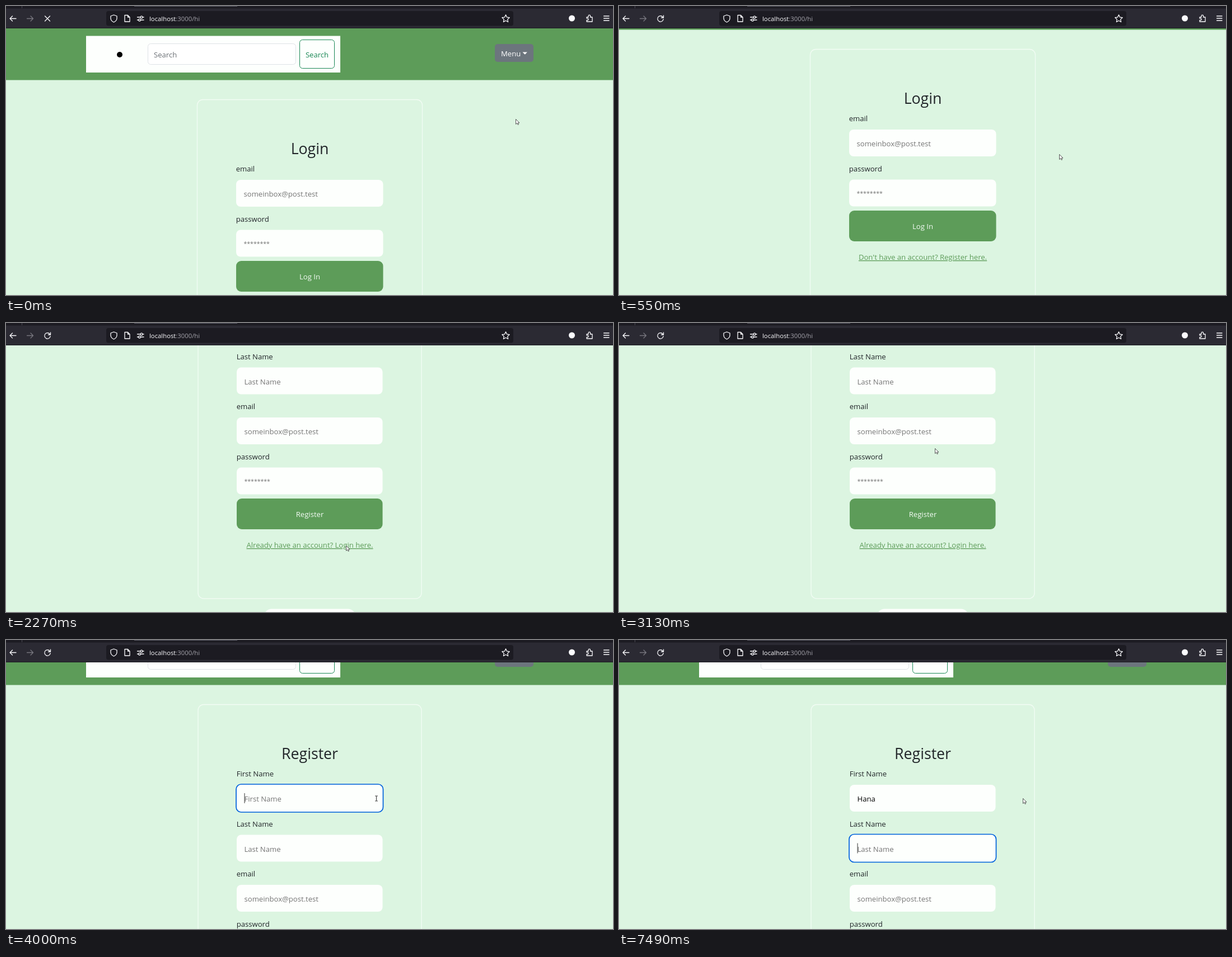
An HTML page for the animation above (8000 ms loop, 1084 by 517 pixels).

```html
<!DOCTYPE html>
<html lang="en">
<head>
<meta charset="utf-8">
<title>Login and register</title>
<style>
  html, body { margin: 0; width: 100%; height: 100%; overflow: hidden; background: #dcf5e1; }
  svg { display: block; font: 13.1px "Open Sans", "Noto Sans", sans-serif; }
  text { white-space: pre; }
  .mid { text-anchor: middle; }
  .title { font-size: 26.7px; }
  .hint { fill: #757575; }
  .stars { font-size: 10.5px; }
  .link { fill: #5d9c59; text-decoration: underline; text-decoration-thickness: 1px; }
  .line { fill: none; stroke: #fbfbfe; stroke-width: 1.3; stroke-linecap: round; stroke-linejoin: round; }
</style>
</head>
<body>
<svg width="1084" height="517" viewBox="0 0 1084 517">
  <rect width="1084" height="517" fill="#dcf5e1"/>
  <g id="page">
    <rect y="40" width="1084" height="92.5" fill="#5d9c59"/>
    <rect x="143" y="53.5" width="454" height="65.5" fill="#fdfffd"/>
    <circle cx="203" cy="87" r="5"/>
    <rect x="253.5" y="67.5" width="264" height="37" rx="5" fill="#fff" stroke="#dee2e6"/>
    <text x="264" y="92" fill="#6b7075">Search</text>
    <rect x="524.5" y="60.5" width="62" height="51" rx="5" fill="none" stroke="#198754"/>
    <text class="mid" x="555.5" y="92" fill="#198754">Search</text>
    <rect x="873" y="68" width="69" height="32" rx="5" fill="#6c757d"/>
    <text x="884" y="89.5" fill="#fff">Menu</text>
    <path d="M922.5 82.5h8.4l-4.2 4.2z" fill="#fff"/>
    <g id="login"></g>
    <g id="register"></g>
  </g>

  <g id="browser">
    <rect width="1084" height="40" fill="#2b2a33"/>
    <rect width="1084" height="4.5" fill="#1c1b22"/>
    <path d="M229 .5h184" stroke="#5b5b66"/>
    <path d="M28.5 0v4" stroke="#4a4953"/>
    <path d="M0 39.5h1084" stroke="#1c1b22"/>
    <rect x="179" y="9" width="727" height="26.5" rx="4" fill="#1c1b22"/>
    <text x="256" y="27" fill="#fbfbfe" font-size="11.3">localhost<tspan fill="#a3a2aa">:3000/hi</tspan></text>
    <g class="line">
      <path d="M18 22.5H7m4.5-4.5L7 22.5l4.5 4.5"/>
      <path d="M37.500 22.500h11m-4.500-4.500l4.500 4.500l-4.500 4.500" stroke="#77767e"/>
      <path id="stop" d="M69.500 18l9 9m0-9l-9 9"/>
      <path id="reload" d="M78.500 20.200a5.200 5.200 0 1 0 .7 3.500M79.500 17v4h-4"/>
      <path d="M192.500 16l5.500 2v4q0 4.500-5.500 7q-5.500-2.500-5.500-7v-4z"/>
      <path d="M212 16.500h5.500l3.500 3.500v8h-9zM217.500 16.500v3.500h3.500"/>
      <path d="M234.500 20h5m5 0h1.500M234.500 25h1.500m5 0h5"/>
      <circle cx="242" cy="20" r="1.900"/><circle cx="238.500" cy="25" r="1.900"/>
      <path d="M892.500 15.800l2 4.300l4.600.600l-3.400 3.200l.900 4.600l-4.100-2.300l-4.100 2.300l.9-4.600l-3.400-3.200l4.600-.600z"/>
      <path d="M1037 20h3v-2a1.800 1.800 0 0 1 3.600 0v2h3.400v8h-10v-2.500h1.500a1.700 1.700 0 0 0 0-3.400h-1.500z"/>
      <path d="M1067.500 18h9.500m-9.500 4h9.500m-9.500 4h9.500"/>
    </g>
    <circle cx="1010.500" cy="22" r="5.500" fill="#fbfbfe"/>
  </g>

  <g id="pointer">
    <path id="arrow" d="M.5.500v9l2.200-2l1.500 3l1.300-.600l-1.400-2.900h2.900z" fill="#fff" stroke="#444" stroke-width=".9"/>
    <path id="beam" d="M-2.500-4.500h5M0-4.500v9M-2.500 4.500h5" fill="none" stroke="#444" stroke-width="1.200"/>
  </g>
</svg>
<script>
const $ = id => document.getElementById(id);
const show = (id, on) => $(id).setAttribute('visibility', on ? 'inherit' : 'hidden');
const move = (id, x, y) => $(id).setAttribute('transform', `translate(${x} ${y})`);

const GAP = 89.5, CENTER = 542.5, TYPED = 'Hana';
const email = ['email', 'someinbox@post.test'], password = ['password', '********'];

function form({ inset, title, fields, button, link, pill }) {
  const left = 411 + inset, width = 262.5 - 2 * inset;
  const cardLeft = 341.5 + inset * 1.5, extra = (fields.length - 2) * GAP;
  const centered = (y, text, attrs) => `<text x="${CENTER}" y="${y}" ${attrs}>${text}</text>`;
  const rows = fields.map(([label, hint], i) => {
    const y = i * GAP, stars = hint[0] === '*';
    return `<text x="${left - .3}" y="${296 + y}" fill="#212529">${label}</text>
      <rect x="${left}" y="${311 + y}" width="${width}" height="48" rx="8" fill="#fdfffd"/>
      <text class="hint ${stars ? 'stars' : ''}" x="${left + 13.5}" y="${(stars ? 339.5 : 341) + y}">${hint}</text>`;
  });
  return `<rect x="${cardLeft}" y="167.5" width="${2 * (CENTER - cardLeft)}" height="${467.5 + extra}"
      rx="10" fill="none" stroke="#f2fcf4" stroke-width="1.300"/>
    ${centered(264.5, title, 'class="mid title" fill="#212529"')}
    ${rows.join('')}
    <rect x="${left}" y="${456 + extra}" width="${width}" height="55" rx="9" fill="#5d9c59"/>
    ${centered(489 + extra, button, 'class="mid" fill="#f3fbf4"')}
    ${centered(544 + extra, link, 'class="mid link"')}
    <rect x="${CENTER - pill / 2}" y="${653.5 + extra}" width="${pill}" height="40" rx="14" fill="#fdfffd"/>`;
}

$('login').innerHTML = form({
  inset: 0, title: 'Login', fields: [email, password], button: 'Log In',
  link: "Don't have an account? Register here.", pill: 150
});
$('register').innerHTML = form({
  inset: 1, title: 'Register',
  fields: [['First Name', 'First Name'], ['Last Name', 'Last Name'], email, password],
  button: 'Register', link: 'Already have an account? Login here.', pill: 164
}) + `<g id="focus">
    <rect x="411" y="310" width="262.5" height="50" rx="9" fill="none" stroke="#0060df" stroke-width="1.700"/>
    <path id="caret" d="M.5 326v18" stroke="#333"/>
  </g>`;
const firstName = $('register').querySelector('.hint');

// Each track holds its value until the next time.
const pointer = [
  [0, 910, 202], [150, 795, 261], [310, 786, 265],
  [920, 798, 253], [1040, 770, 290], [1160, 725, 340], [1280, 672, 383], [1400, 625, 408], [1520, 607, 398],
  [2520, 625, 403], [2640, 650, 407], [2890, 636, 365], [3010, 598, 290], [3130, 564, 224],
  [3610, 566, 283], [4000, 661.5, 283.5], [4120, 721, 283]
];
const scroll = [
  [0, 0], [310, 15], [430, 50], [550, 90], [670, 142],
  [2270, 321], [3250, 285], [3370, 200], [3490, 110], [3610, 52]
];
const letters = [[0, 0], [4990, 1], [5250, 2], [5370, 3], [5490, 4]];
const caret = [[0, 1], [4370, 0], [4870, 1], [6490, 0], [7490, 1]];
const at = (track, t) => track.findLast(key => key[0] <= t).slice(1);

function draw(now) {
  const t = now % 8000;
  const [x, y] = at(pointer, t), [top] = at(scroll, t);
  const [count] = at(letters, t), [caretOn] = at(caret, t);
  const second = t >= 5990, overField = t >= 3610 && t < 4120;

  move('page', 0, -top);
  show('login', t < 2270);
  show('register', t >= 2270);
  show('stop', t < 310);
  show('reload', t >= 310);

  firstName.textContent = TYPED.slice(0, count) || 'First Name';
  firstName.style.fill = count ? '#000' : '';
  const typedWidth = count && !second ? firstName.getComputedTextLength() : 0;
  show('focus', t >= 3750);
  move('focus', 0, second ? GAP : 0);
  show('caret', caretOn);
  move('caret', 425.5 + Math.round(typedWidth), 0);

  move('pointer', x, y);
  show('arrow', !overField);
  show('beam', overField);
  requestAnimationFrame(draw);
}
requestAnimationFrame(draw);
</script>
</body>
</html>
```
